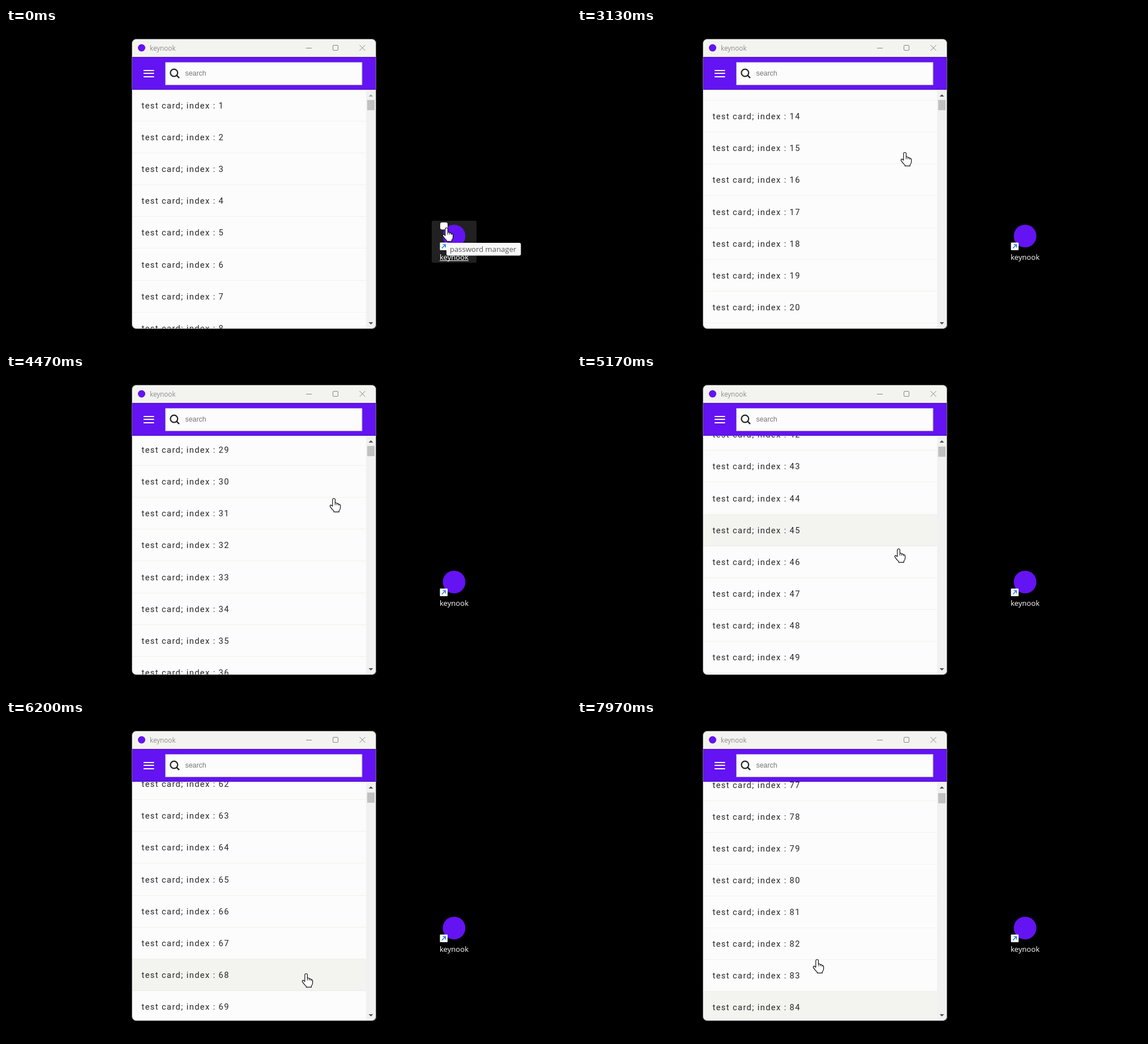
These frames come from a looping animation (998 by 561 pixels, 8000 ms). An HTML page with a canvas:

```html
<!DOCTYPE html>
<html lang="en">
<head>
<meta charset="utf-8">
<title>Password list</title>
<style>
  html, body { margin: 0; width: 100%; height: 100%; overflow: hidden; background: #000; }
  canvas { display: block; width: 100vw; height: 100vh; }
</style>
</head>
<body>
<canvas id="stage" width="998" height="561"></canvas>
<script>
const ctx = document.getElementById('stage').getContext('2d');
const LOOP = 8000;
const APP = 'keynook';
const PURPLE = '#6413f2';
const UI_FONT = '"Open Sans", "Noto Sans", sans-serif';
const ROW = 56.1;
const LIST_TOP = 109;
const SCROLL_START = 2330;

// time, scroll offset
const scrollKeys = [
  [0, 0], [SCROLL_START, 0], [3130, 709.3], [4470, 1572.8],
  [5170, 2328.7], [6200, 3445.2], [7970, 4285.7], [8000, 4288]
];

// time, x, y of the pointer tip
const pointerKeys = [
  [0, 778, 353], [300, 778, 353], [1200, 569, 190], [2030, 569, 190],
  [2350, 579, 220], [4600, 579, 220], [5170, 568, 309], [6200, 530, 448],
  [7780, 440, 500], [7970, 424, 423], [8000, 424, 423]
];

const hand = new Path2D('M-2.2 2Q-2.2-.5 .2-.5Q2.4-.5 2.4 2V7.5Q4.6 6.4 5.6 8.6' +
  'Q8 7.6 8.7 10Q11.6 9.6 11.6 12.5V16Q11.6 19 9.3 21V23.3H.2V21.6' +
  'Q-3.5 18.5-6.6 13.6Q-7 11.2-4.8 11.2L-2.2 13.2Z');
const arrow = new Path2D('M0 0V16.5L4 12.8L6.5 18.6L9 17.5L6.5 11.8H12Z');

function segment(keys, t) {
  let i = 0;
  while (i < keys.length - 2 && t >= keys[i + 1][0]) i++;
  return i;
}

// Monotone cubic interpolation keeps the scroll from turning back.
function scrollAt(t) {
  const slope = i => (scrollKeys[i + 1][1] - scrollKeys[i][1]) / (scrollKeys[i + 1][0] - scrollKeys[i][0]);
  const tangent = i => {
    if (i === 0 || i === scrollKeys.length - 1) return 0;
    const a = slope(i - 1), b = slope(i);
    return a * b > 0 ? 2 * a * b / (a + b) : 0;
  };
  const i = segment(scrollKeys, t);
  const [t0, y0] = scrollKeys[i], [t1, y1] = scrollKeys[i + 1];
  const d = t1 - t0, u = (t - t0) / d, v = 1 - u;
  return v * v * (1 + 2 * u) * y0 + u * u * (3 - 2 * u) * y1 +
    d * u * v * (v * tangent(i) - u * tangent(i + 1));
}

function pointerAt(t) {
  const i = segment(pointerKeys, t);
  const [t0, x0, y0] = pointerKeys[i], [t1, x1, y1] = pointerKeys[i + 1];
  const u = (t - t0) / (t1 - t0), s = u * u * (3 - 2 * u);
  return { x: x0 + (x1 - x0) * s, y: y0 + (y1 - y0) * s };
}

const within = (p, x0, y0, x1, y1) => p.x >= x0 && p.x < x1 && p.y >= y0 && p.y < y1;
const overList = p => within(p, 223, LIST_TOP, 636, 530);
const overIcon = p => within(p, 752, 340, 831, 414);

function rowUnderPointer(t) {
  const p = pointerAt(t);
  return overList(p) ? Math.floor((p.y - LIST_TOP + scrollAt(t)) / ROW) + 1 : 0;
}

// The highlight only follows the pointer when it moves, slightly late.
function hoverRow(t) {
  if (t < SCROLL_START) return rowUnderPointer(t);
  if (t < 4700) return 2;
  return t < 7800 ? rowUnderPointer(t - 25) : 84;
}

function rect(x, y, w, h, color) {
  ctx.fillStyle = color;
  ctx.fillRect(x, y, w, h);
}

function roundRect(x, y, w, h, r, color) {
  ctx.beginPath();
  ctx.roundRect(x, y, w, h, r);
  ctx.fillStyle = color;
  ctx.fill();
}

function frameRect(x, y, w, h, r, color) {
  ctx.beginPath();
  ctx.roundRect(x, y, w, h, r);
  ctx.strokeStyle = color;
  ctx.lineWidth = 1;
  ctx.stroke();
}

function circle(x, y, r) {
  ctx.beginPath();
  ctx.arc(x, y, r, 0, Math.PI * 2);
}

function dot(x, y, r, color) {
  circle(x, y, r);
  ctx.fillStyle = color;
  ctx.fill();
}

function poly(...pts) {
  ctx.beginPath();
  for (let i = 0; i < pts.length; i += 2) ctx.lineTo(pts[i], pts[i + 1]);
}

function line(color, width, ...pts) {
  poly(...pts);
  ctx.strokeStyle = color;
  ctx.lineWidth = width;
  ctx.stroke();
}

function text(str, x, y, font, color, align = 'left', spacing = 0) {
  ctx.font = font;
  ctx.letterSpacing = spacing + 'px';
  ctx.textAlign = align;
  ctx.fillStyle = color;
  ctx.fillText(str, x, y);
}

function drawTitleBar() {
  rect(222, 19, 432, 32, '#f3f3f0');
  dot(239.5, 35, 6.5, PURPLE);
  text(APP, 254, 40, '11.7px ' + UI_FONT, '#8c8c8c');
  const gray = '#858585';
  line(gray, 1, 530, 35.5, 540, 35.5);
  frameRect(577.5, 30.5, 9, 9, 1.5, gray);
  line(gray, 1, 624.5, 30, 634.5, 40);
  line(gray, 1, 634.5, 30, 624.5, 40);
}

function drawHeader() {
  const edge = '#4f12c0';
  rect(222, 51, 432, 58, PURPLE);
  rect(222, 51, 432, 1, edge);
  rect(222, 108, 432, 1, edge);
  for (const y of [75, 80, 86]) line('#fff', 2, 243, y, 261.5, y);
  rect(282, 60, 347, 41, '#fcfcfc');
  frameRect(281.5, 60.5, 347.5, 40, 0, '#a394d6');
  circle(296.8, 79, 6.4);
  ctx.strokeStyle = '#222';
  ctx.lineWidth = 2.2;
  ctx.stroke();
  line('#222', 2.4, 301.2, 83.4, 306, 88.2);
  text('search', 316.5, 84, '12.4px "Liberation Sans", Arial, sans-serif', '#757575');
}

function drawList(scroll, hover) {
  ctx.save();
  ctx.beginPath();
  ctx.rect(222, LIST_TOP, 432, 422);
  ctx.clip();
  rect(222, LIST_TOP, 432, 422, '#fcfcfc');
  const first = Math.floor(scroll / ROW) + 1;
  for (let n = first; n < first + 9; n++) {
    const top = Math.round(LIST_TOP + (n - 1) * ROW - scroll);
    if (n === hover) rect(222, top, 414, 56, '#f3f3f0');
    rect(222, top + 55, 414, 1, n === hover ? '#eaeaea' : '#f2f2ea');
    text('test card; index : ' + n, 239.5, top + 32.5, '14.7px Roboto, sans-serif', '#262626', 'left', 1.37);
  }
  drawScrollbar(scroll);
  ctx.restore();
}

function drawScrollbar(scroll) {
  rect(636, LIST_TOP, 18, 422, '#f1f1f1');
  rect(638, 127 + Math.floor(scroll / 2100), 13, 18, '#c1c1c1');
  ctx.fillStyle = scroll > 0 ? '#505050' : '#a3a3a3';
  poly(640.5, 121, 644.5, 117, 648.5, 121);
  ctx.fill();
  ctx.fillStyle = '#505050';
  poly(640.5, 519, 644.5, 523, 648.5, 519);
  ctx.fill();
}

function drawShortcut(hovered) {
  if (hovered) roundRect(752, 340, 79, 74, 2, '#212121');
  dot(791.5, 367, 20, PURPLE);
  roundRect(766.5, 378.5, 13.5, 13.5, 1, '#fff');
  line('#1583d8', 1.6, 770, 388.5, 776, 382.5);
  line('#1583d8', 1.6, 771.5, 382.3, 776.3, 382.3, 776.3, 387.2);
  text(APP, 791.5, 409, '13.1px ' + UI_FONT, '#fff', 'center');
  if (!hovered) return;
  rect(766, 410, 51, 1, '#fff');
  roundRect(767, 343, 13, 12.5, 3, '#fff');
  roundRect(778, 379, 131.5, 22.5, 3, '#f9f9f9');
  text('password manager', 784, 394.5, '13.15px ' + UI_FONT, '#575757');
}

function drawPointer(p) {
  ctx.save();
  ctx.translate(p.x, p.y);
  const shape = overList(p) || overIcon(p) ? hand : arrow;
  ctx.fillStyle = '#fff';
  ctx.fill(shape);
  ctx.strokeStyle = '#111';
  ctx.lineWidth = 1.2;
  ctx.lineJoin = 'round';
  ctx.stroke(shape);
  if (shape === hand) {
    line('#111', 1, 2.4, 7.5, 2.4, 11.5);
    line('#111', 1, 5.6, 8.6, 5.6, 11.5);
    line('#111', 1, 8.7, 10, 8.7, 12);
  }
  ctx.restore();
}

function drawWindow(t) {
  ctx.save();
  ctx.beginPath();
  ctx.roundRect(222.5, 19.5, 431.5, 511, 7.5);
  ctx.clip();
  drawTitleBar();
  drawHeader();
  drawList(scrollAt(t), hoverRow(t));
  ctx.restore();
  frameRect(222.5, 19.5, 431, 511, 7.5, '#6b6b6b');
}

function draw(t) {
  const pointer = pointerAt(t);
  rect(0, 0, 998, 561, '#000');
  drawWindow(t);
  drawShortcut(overIcon(pointer));
  drawPointer(pointer);
}

const start = performance.now();
function frame() {
  draw((performance.now() - start) % LOOP);
  requestAnimationFrame(frame);
}
frame();
</script>
</body>
</html>
```
